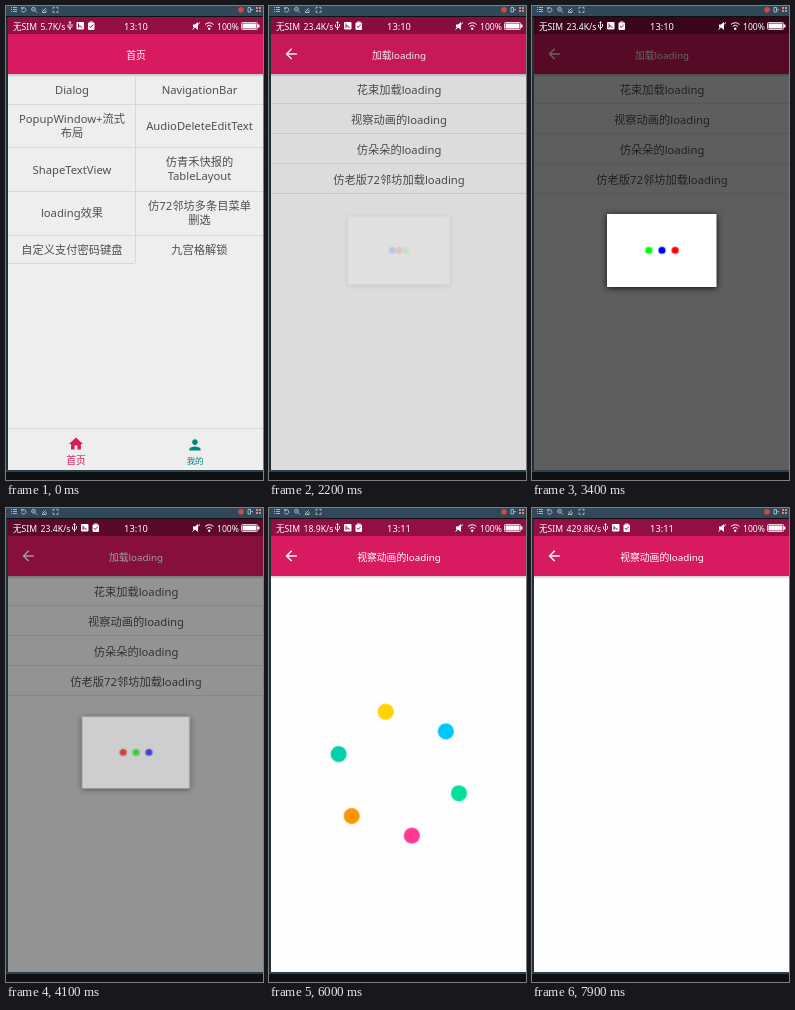
These frames come from a looping animation (257 px wide and 474 px high, 8 s). An HTML page:

```html
<!DOCTYPE html>
<html lang="zh-CN">
<head>
<meta charset="utf-8">
<title>loading</title>
<style>
  html, body { margin: 0; width: 100%; height: 100%; overflow: hidden; background: #0e1112; }
  svg { display: block; width: 257px; height: 474px; }
  text { font: 11.25px "Noto Sans", "Noto Sans CJK SC", "Noto Sans CJK", sans-serif; fill: #505050; text-anchor: middle; }
  .title { font-size: 9.8px; fill: #fff; }
  .status text { font-size: 8.6px; font-weight: 500; fill: #fff; text-anchor: start; }
  .status .clock { font-size: 9.3px; text-anchor: middle; }
  .rule { stroke: #d8d8d8; fill: none; }
  .line { stroke: #fff; fill: none; }

  .home, .list, .list-body, .loader, .scrim, .dialog, .spin, .dot, .side, .hue, .step {
    animation: 8s linear infinite;
  }

  /* page changes */
  .home { animation-name: home-fade; }
  .list { animation-name: list-slide; }
  .list-body { animation-name: list-fade; }
  .loader { animation-name: loader-slide; }
  @keyframes home-fade { 0%, 10.875% { opacity: 1 } 13.4%, 100% { opacity: 0 } }
  @keyframes list-fade { 0%, 68.5% { opacity: 1 } 71.1%, 100% { opacity: 0 } }
  @keyframes list-slide {
    0% { transform: translateX(255px) }
    10.875% { transform: translateX(255px); animation-timing-function: cubic-bezier(.333, .667, .667, 1) }
    16.28%, 100% { transform: none }
  }
  @keyframes loader-slide {
    0% { transform: translateX(255px) }
    68.5% { transform: translateX(255px); animation-timing-function: cubic-bezier(.333, .667, .667, 1) }
    73.875%, 100% { transform: none }
  }

  /* dialog with three dots */
  .scrim { animation-name: dim; }
  .dialog { animation-name: pop; transform-origin: 129.5px 244.5px; }
  @keyframes dim { 0%, 27.2% { opacity: 0 } 29.8%, 50% { opacity: .6 } 53.4%, 100% { opacity: 0 } }
  @keyframes pop {
    0%, 27.2% { opacity: 0; transform: scale(.92) }
    29.8%, 50% { opacity: 1; transform: none }
    52.8%, 100% { opacity: 0; transform: scale(.96) }
  }
  .side { animation-name: spread; }
  @keyframes spread {
    0%, 26.69%, 35.44%, 44.19%, 52.94%, 100% {
      transform: none; animation-timing-function: cubic-bezier(.333, .667, .667, 1);
    }
    31.06%, 39.81%, 48.56% {
      transform: translateX(calc(var(--dir) * 21.2px)); animation-timing-function: cubic-bezier(.333, 0, .667, .333);
    }
  }
  .hue { animation-name: swap; animation-timing-function: step-end; }
  @keyframes swap {
    0% { fill: var(--a) } 35.44% { fill: var(--b) } 44.19% { fill: var(--c) } 52.94%, 100% { fill: var(--a) }
  }

  /* ring: turn, then pull together */
  .spin { animation-name: spin; }
  .dot { animation-name: merge; }
  @keyframes spin { 0%, 68.3% { transform: rotate(0deg) } 89.625%, 100% { transform: rotate(438.7deg) } }
  @keyframes merge {
    0% { transform: translateX(63.3px); opacity: 1 }
    89.625% { transform: translateX(63.3px); animation-timing-function: cubic-bezier(.3333, 0, .6667, -1) }
    98.375% { transform: none; opacity: 1 }
    98.38%, 100% { transform: none; opacity: 0 }
  }

  /* status bar readings */
  .step { animation-timing-function: step-end; }
  .net1 { animation-name: net1; }
  .net2 { animation-name: net2; }
  .net3 { animation-name: net3; }
  .net4 { animation-name: net4; }
  .min1 { animation-name: min1; }
  .min2 { animation-name: min2; }
  @keyframes net1 { 0% { opacity: 1 } 12.5%, 100% { opacity: 0 } }
  @keyframes net2 { 0% { opacity: 0 } 12.5% { opacity: 1 } 56.25%, 100% { opacity: 0 } }
  @keyframes net3 { 0% { opacity: 0 } 56.25% { opacity: 1 } 93.75%, 100% { opacity: 0 } }
  @keyframes net4 { 0% { opacity: 0 } 93.75%, 100% { opacity: 1 } }
  @keyframes min1 { 0% { opacity: 1 } 61.25%, 100% { opacity: 0 } }
  @keyframes min2 { 0% { opacity: 0 } 61.25%, 100% { opacity: 1 } }
</style>
</head>
<body>
<svg viewBox="0 0 257 474">
  <defs>
    <clipPath id="screen"><path d="M2 11H257V464H2z"/></clipPath>
    <linearGradient id="shade" x2="0" y2="1">
      <stop stop-color="#000" stop-opacity=".2"/><stop offset="1" stop-color="#000" stop-opacity="0"/>
    </linearGradient>
    <g id="bar">
      <path d="M2 11H257V28H2z" fill="#920f45"/>
      <path d="M2 28H257V68H2z" fill="#d81b60"/>
      <path d="M2 68H257V71H2z" fill="url(#shade)"/>
    </g>
    <path id="back" transform="translate(13.7 39.5) scale(.706)" fill="#fff"
      d="M20 11H7.83l5.59-5.59L12 4l-8 8 8 8 1.41-1.41L7.83 13H20z"/>
    <g id="icons" class="line">
      <path d="M4 16v8M2 18.5v2.5l2 1.5 2-2v-2.5M3 17l1-1.5 1 1.5" stroke-width=".9"/>
      <rect x="10.5" y="16" width="7.5" height="7.5" rx="1" fill="#fff" stroke="none"/>
      <path d="M12.5 17.5v4.5M12.5 20h2l1.5 2" stroke="#920f45" stroke-width=".9"/>
      <rect x="22" y="16.5" width="6.5" height="7.5" rx="1" fill="#fff" stroke="none"/>
      <path d="M23.5 20l1.3 1.5 2.4-3" stroke="#920f45" stroke-width=".9"/>
      <path d="M23.5 16h3.5"/>
    </g>
  </defs>

  <!-- window frame -->
  <path d="M0 0H257V474H0z" fill="#0e1112"/>
  <path d="M0 11H2V464H0z" fill="#1f2f38"/>
  <path d="M0 464H257V466H0z" fill="#2c414c"/>
  <path d="M0 0H257V10H0z" fill="#30485a"/>
  <g class="line" stroke-width=".8" style="stroke:#c6d0d6">
    <path d="M5 1.5h1M7 1.5h4M5 3.5h1M7 3.5h4M5 5.5h1M7 5.5h4"/>
    <path d="M16 2.2a2.3 2.3 0 1 1-.6 2.3M15.5 1v1.8h2"/>
    <circle cx="27.5" cy="3.2" r="1.9"/><path d="M29 4.7l2 2M26.7 3.2h1.6"/>
    <path d="M36 6l4-4M36.5 3.5l2 2M40 4v2.5h-4"/>
    <path d="M47 3V1.3h1.8M50.2 1.3H52V3M52 4.5v1.8h-1.8M48.8 6.3H47V4.5"/>
    <path d="M242 1.5h2.5v4.5H242zM245 3.7h2"/>
  </g>
  <circle cx="235" cy="3.7" r="2.8" fill="#d5483f"/>
  <path d="M250 1h2v2h-2zM253 1h2v2h-2zM250 4h2v2h-2zM253 4h2v2h-2z" fill="#d98a84"/>

  <g clip-path="url(#screen)">
    <path d="M2 11H257V464H2z" fill="#000"/>

    <g class="home">
      <path d="M2 11H257V464H2z" fill="#eee"/>
      <use href="#bar"/>
      <text class="title" x="130" y="52.5">首页</text>
      <path class="rule" d="M2 98.5H257M2 141.5H257M2 185.5H257M2 229.5H257M2 257.5H129M129.5 69V257"/>
      <text x="66" y="87.5">Dialog</text>
      <text x="193.5" y="87.5">NavigationBar</text>
      <text x="66" y="117">PopupWindow+流式</text>
      <text x="66" y="131">布局</text>
      <text x="193.5" y="124">AudioDeleteEditText</text>
      <text x="66" y="167.5">ShapeTextView</text>
      <text x="193.5" y="160">仿青禾快报的</text>
      <text x="193.5" y="174">TableLayout</text>
      <text x="66" y="211">loading效果</text>
      <text x="193.5" y="204">仿72邻坊多条目菜单</text>
      <text x="193.5" y="218">删选</text>
      <text x="66" y="248">自定义支付密码键盘</text>
      <text x="193.5" y="248">九宫格解锁</text>
      <path class="rule" d="M2 422.5H257"/>
      <path transform="translate(61.5 429.5) scale(.706)" fill="#d81b60" d="M10 20v-6h4v6h5v-8h3L12 3 2 12h3v8z"/>
      <path transform="translate(180.5 430.5) scale(.706)" fill="#008577"
        d="M12 12c2.21 0 4-1.79 4-4s-1.79-4-4-4-4 1.79-4 4 1.79 4 4 4zm0 2c-2.67 0-8 1.34-8 4v2h16v-2c0-2.66-5.33-4-8-4z"/>
      <text x="70" y="457.5" style="font-size:9.8px;fill:#d81b60">首页</text>
      <text x="189" y="457.5" style="font-size:8.4px;fill:#008577">我的</text>
    </g>

    <g class="list"><g class="list-body">
      <path d="M2 11H257V464H2z" fill="#eee"/>
      <use href="#bar"/><use href="#back"/>
      <text class="title" x="130" y="52.5">加载loading</text>
      <path class="rule" d="M2 97.5H257M2 127.5H257M2 157.5H257M2 187.5H257"/>
      <text x="130" y="87.5">花束加载loading</text>
      <text x="130" y="117.5">视察动画的loading</text>
      <text x="130" y="147.5">仿朵朵的loading</text>
      <text x="130" y="177.5">仿老版72邻坊加载loading</text>
    </g></g>

    <g class="loader">
      <path d="M2 11H257V464H2z" fill="#fefefe"/>
      <use href="#bar"/><use href="#back"/>
      <text class="title" x="130" y="52.5">视察动画的loading</text>
      <g transform="translate(129.8 265.7)"><g class="spin">
        <g><circle class="dot" r="8" fill="#ff9600"/></g>
        <g transform="rotate(60)"><circle class="dot" r="8" fill="#02d1ac"/></g>
        <g transform="rotate(120)"><circle class="dot" r="8" fill="#ffd200"/></g>
        <g transform="rotate(180)"><circle class="dot" r="8" fill="#00c6ff"/></g>
        <g transform="rotate(240)"><circle class="dot" r="8" fill="#00e099"/></g>
        <g transform="rotate(300)"><circle class="dot" r="8" fill="#ff3891"/></g>
      </g></g>
    </g>

    <path class="scrim" d="M2 11H257V464H2z"/>
    <g class="dialog">
      <rect x="75" y="208" width="109.5" height="73" fill="#fff" style="filter:drop-shadow(0 1px 3px rgba(0,0,0,.85))"/>
      <g transform="translate(130 244.3)">
        <g class="side" style="--dir:-1"><circle class="hue" r="3.6" style="--a:#00f;--b:#0f0;--c:#f00"/></g>
        <g class="side" style="--dir:1"><circle class="hue" r="3.6" style="--a:#0f0;--b:#f00;--c:#00f"/></g>
        <circle class="hue" r="3.6" style="--a:#f00;--b:#00f;--c:#0f0"/>
      </g>
    </g>
  </g>

  <g class="status">
    <text x="7" y="23.5">无SIM</text>
    <g class="step net1"><text x="34.6" y="23.5">5.7K/s</text><use href="#icons" x="60"/></g>
    <g class="step net2"><text x="34.6" y="23.5">23.4K/s</text><use href="#icons" x="64.5"/></g>
    <g class="step net3"><text x="34.6" y="23.5">18.9K/s</text><use href="#icons" x="64.5"/></g>
    <g class="step net4"><text x="34.6" y="23.5">429.8K/s</text><use href="#icons" x="69.5"/></g>
    <text class="clock step min1" x="130" y="23.7">13:10</text>
    <text class="clock step min2" x="130" y="23.7">13:11</text>
    <path d="M187 18.5h2l3-2.5v8l-3-2.5h-2z" fill="#fff"/>
    <path class="line" d="M186.5 23.5l7.5-7"/>
    <path class="line" d="M199 18.5a6 6 0 0 1 8.5 0M200.7 20.5a3.6 3.6 0 0 1 5.1 0"/>
    <circle cx="203.2" cy="22.7" r="1.2" fill="#fff"/>
    <text x="211" y="23.5">100%</text>
    <rect class="line" x="235.5" y="16.5" width="16" height="7" rx="1" stroke-width=".8"/>
    <path d="M236.5 17.5h14v5h-14zM252 18.5h1.5v3H252z" fill="#fff"/>
  </g>
</svg>
</body>
</html>
```
